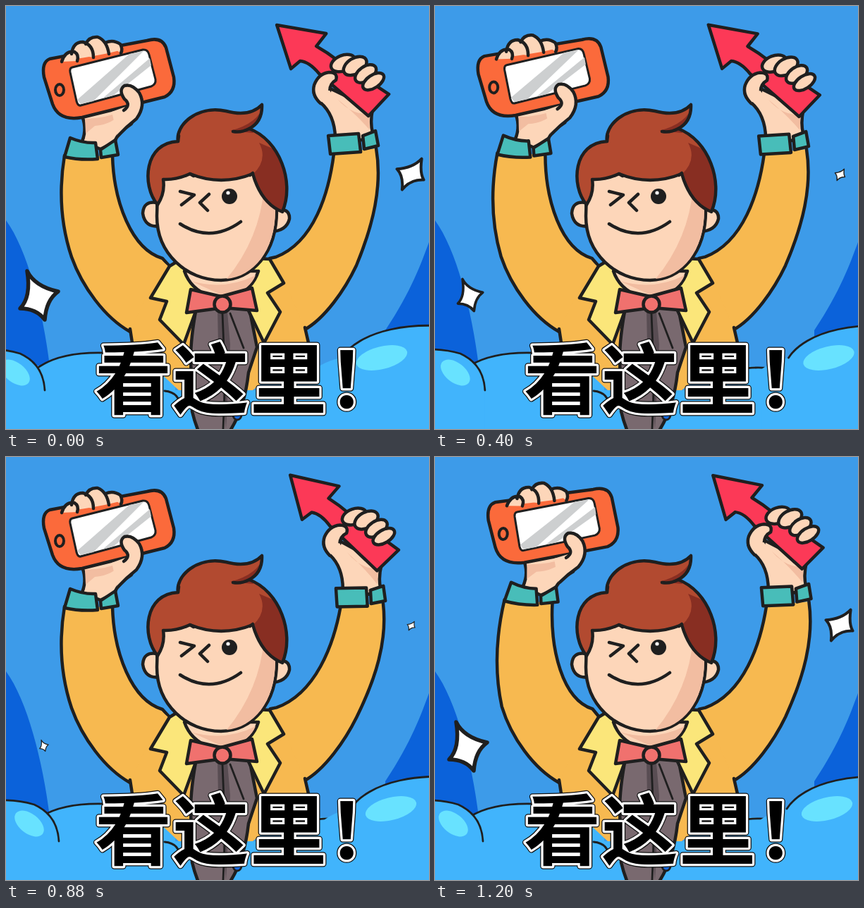
An HTML page for the animation above (1240 ms loop, 600 by 600 pixels).

```html
<!DOCTYPE html>
<html lang="zh-CN">
<head>
<meta charset="utf-8">
<style>
  html, body { margin: 0; width: 100%; height: 100%; overflow: hidden; background: #3d9be9; }
  svg { display: block; width: 100vw; height: 100vh; }
  .ink { stroke: #1f1f1f; stroke-width: 4.5; stroke-linecap: round; stroke-linejoin: round; }
  .thin { stroke-width: 2.8; }
  .star { stroke-width: 5.5; fill: #fff; }
  .line { fill: none; }
  .cloud { fill: #41b4fc; }
  .shine { fill: #68e2ff; }
  .skin { fill: #fdd6b9; }
  .shade { fill: #f2bda1; }
  .coat { fill: #f7b950; }
  .lapel { fill: #fbe67a; }
  .teal { fill: #48bdb9; }
  .bow { fill: #f0716e; }
  text { font: 700 109px "Noto Sans CJK SC", "Noto Sans CJK", sans-serif; letter-spacing: 1px; stroke-linejoin: round; }
</style>
</head>
<body>
<svg viewBox="0 0 600 600">
  <defs>
    <path id="hair" d="M215,282 C192,254 196,194 244,192 C240,170 270,140 312,149 Q346,158 363,140 Q364,164 345,174 C388,190 410,250 392,292 Q362,280 350,238 Q305,256 261,238 Q242,247 223,246 Q226,265 215,282Z"/>
    <clipPath id="hairClip"><use href="#hair"/></clipPath>
  </defs>
  <rect width="600" height="600" fill="#3d9be9"/>
  <path fill="#0b62da" d="M0,304 C30,345 52,430 62,510 H0Z M600,335 C590,362 575,405 538,460 V475 H600Z"/>

  <g id="starL"><path class="ink star" d="M-17,-35 Q-6,-13 27,-6 Q10,6 8,34 Q-4,18 -27,18 Q-11,2 -17,-35Z"/></g>
  <g id="starR"><path class="ink star" d="M20,-32 Q16,-4 24,9 Q-2,8 -18,28 Q-15,2 -28,-12 Q3,-14 20,-32Z"/></g>

  <path class="cloud" d="M30,600 V530 C55,500 90,488 140,493 L190,490 H240 V600Z M230,545 H600 V600 H230Z M430,545 V510 Q470,510 505,522 V545Z"/>
  <path class="ink thin line" d="M40,517 Q72,490 140,492 M225,546 Q249,548 247,575 M440,514 Q475,510 505,521"/>
  <g id="cloudL">
    <path class="cloud" d="M-90,600 V500 Q-30,480 20,493 Q53,508 55,545 V600Z"/>
    <path class="ink thin line" d="M-90,500 Q-30,478 20,493 Q53,508 55,545"/>
    <ellipse class="shine" cx="13" cy="520" rx="24" ry="14" transform="rotate(38 13 520)"/>
  </g>
  <g id="cloudR">
    <path class="cloud" d="M700,600 V462 C600,440 525,463 502,499 Q480,503 464,515 V600Z"/>
    <path class="ink thin line" d="M700,462 C600,440 525,463 502,499"/>
    <ellipse class="shine" cx="559" cy="499" rx="37" ry="16" transform="rotate(-14 559 499)"/>
  </g>

  <path id="sleeveL" class="ink coat"/>
  <path id="sleeveR" class="ink coat"/>

  <g id="handL">
    <path class="ink skin" d="M106,152 Q116,172 108,192 L134,203 L154,193 Q158,180 178,167 L185,140Z"/>
    <path class="shade" d="M112,160 Q140,160 168,148 Q152,168 126,170 L113,181Z"/>
    <path class="ink" fill="#fb6a3b" d="M62,75 L200,49 Q221,43 227,59 L238,101 Q241,121 225,129 L108,158 Q75,164 66,139 L54,101 Q50,80 62,75Z"/>
    <path class="ink" fill="#fff" style="stroke-width:3" d="M94,87 L194,62 Q201,61 203,69 L212,104 Q213,111 206,114 L106,141 Q102,142 100,135 L91,94 Q90,88 94,87Z"/>
    <path fill="#cdcfd0" d="M101,133 L175,68 L195,64 L124,135 L106,139Z M137,131 L204,74 L206,84 L152,127Z"/>
    <ellipse class="ink line" cx="76" cy="119" rx="6" ry="8" style="stroke-width:4"/>
    <path class="skin" d="M84,78 L101,65 L126,50 L150,53 L161,63 L145,67 L124,71 L100,75Z"/>
    <path class="ink skin" d="M79,79 Q84,63 97,65 Q104,69 101,78 M93,68 Q95,51 109,51 Q124,55 124,73 M113,54 Q118,43 130,44 Q143,49 146,68 M141,52 Q152,47 162,54 Q166,61 163,67"/>
    <path class="skin" d="M150,150 L172,142 L185,120 L193,140 L182,162 L158,184Z"/>
    <path class="ink skin" d="M167,148 Q178,140 168,132 Q159,119 168,113 Q179,110 189,123 Q199,141 185,160 Q171,171 160,183"/>
    <path class="ink teal" d="M91,187 Q110,195 127,194 L130,217 Q105,219 83,214Z M134,204 L155,190 L159,211 L135,215Z"/>
  </g>

  <g id="handR">
    <path class="ink skin" d="M441,108 Q430,124 446,137 Q466,154 467,187 L504,190 L520,180 Q516,165 520,146Z"/>
    <path class="shade" d="M470,132 Q490,155 516,153 L515,175 Q496,153 470,132Z"/>
    <path class="ink" fill="#fc3957" d="M384,27 L454,39 L440,57 Q456,66 470,77 L543,125 L514,156 L444,96 Q430,79 417,78 L404,89Z"/>
    <path class="ink skin" d="M459,121 Q459,110 468,105 Q471,94 458,94 Q443,96 437,112 Q433,126 446,138"/>
    <path class="skin" d="M440,118 L459,120 L472,140 L462,150Z"/>
    <g class="ink skin">
      <ellipse cx="478" cy="81" rx="18" ry="11" transform="rotate(-22 478 81)"/>
      <ellipse cx="495" cy="85" rx="18" ry="11" transform="rotate(-32 495 85)"/>
      <ellipse cx="510" cy="96" rx="17" ry="10" transform="rotate(-36 510 96)"/>
      <ellipse cx="521" cy="107" rx="17" ry="9" transform="rotate(-34 521 107)"/>
    </g>
    <path class="ink teal" d="M457,184 L500,181 L503,207 L460,210Z M506,184 L524,177 L528,198 L508,203Z"/>
  </g>

  <path class="coat" d="M176,460 L222,362 L300,430 L383,360 L424,458 L428,482 L350,545 H245 L182,486Z"/>
  <path class="ink line" d="M176,458 L180,484 M424,456 L430,482"/>
  <path class="ink" fill="#79696f" d="M270,428 Q262,470 262,500 L264,575 Q268,592 275,608 H314 Q338,575 344,520 L356,484 L345,428Z"/>
  <path fill="#594d53" d="M300,430 L314,434 L318,480 L312,600 L301,480Z"/>
  <path class="ink line thin" d="M307,436 L309,485 M318,436 L337,485 M310,550 L308,600"/>
  <ellipse class="ink thin" cx="328" cy="580" rx="6" ry="7" fill="#1767d9"/>
  <path class="ink lapel" d="M232,369 L205,414 L228,419 L218,445 L252,480 L268,436 L285,405 L250,358Z M374,359 L394,393 L371,407 L389,434 L366,478 L344,432 L328,405 L355,358Z"/>
  <path class="ink skin" d="M253,376 Q262,402 290,412 H322 Q350,402 358,376Z"/>
  <path class="shade" d="M262,390 Q310,404 354,382 Q346,402 320,410 H306Z"/>
  <path class="ink bow" d="M262,402 L305,412 L349,400 L356,432 L308,428 L256,435Z"/>
  <circle class="ink bow" cx="307" cy="423" r="11.5"/>

  <path class="ink skin" d="M214,279 Q195,276 194,294 Q197,315 218,312Z M382,289 Q403,286 402,302 Q398,319 376,320Z"/>
  <path class="ink skin" d="M216,236 L214,298 C214,351 256,389 305,389 C350,388 384,350 384,290 L370,225Z"/>
  <path class="shade" d="M366,258 Q360,330 313,387 C350,384 382,348 382,290Z"/>
  <use href="#hair" fill="#b24a30"/>
  <path clip-path="url(#hairClip)" fill="#882e22" d="M350,239 Q372,218 359,194 L385,205 L410,250 L395,300 L350,280Z M366,138 Q360,166 318,177 L350,180 L370,165Z"/>
  <use href="#hair" class="ink line"/>
  <path class="ink line" d="M244,192 L245,184 M261,238 L266,241 M350,237 L346,240 M345,174 Q334,180 322,178"/>
  <path class="ink line" d="M247,263 L267,268 L249,282 M288,267 L275,279 L286,290 M247,309 Q290,337 333,306"/>
  <circle cx="317" cy="270" r="11" fill="#1f1f1f"/>
  <circle cx="315" cy="265" r="2.6" fill="#fff"/>

  <g>
    <text x="126" y="570" stroke="#111" stroke-width="9">看这里！</text>
    <text x="126" y="570" stroke="#fff" stroke-width="6.5">看这里！</text>
    <text x="126" y="570">看这里！</text>
  </g>
</svg>
<script>
const LOOP = 1240, STEP = 40;
const $ = id => document.getElementById(id);
const put = (id, value) => $(id).setAttribute('transform', value);

// Smooth curve through [time, value] points.
function track(pts) {
  const slope = i => {
    const a = pts[Math.max(i - 1, 0)], b = pts[Math.min(i + 1, pts.length - 1)];
    return (b[1] - a[1]) / (b[0] - a[0]);
  };
  return t => {
    let i = 0;
    while (i < pts.length - 2 && t > pts[i + 1][0]) i++;
    const [t0, a] = pts[i], [t1, b] = pts[i + 1];
    const h = t1 - t0, u = Math.min((t - t0) / h, 1), v = 1 - u;
    return a * v * v * (1 + 2 * u) + b * u * u * (3 - 2 * u)
      + h * u * v * (slope(i) * v - slope(i + 1) * u);
  };
}

const phone = track([[0, 0], [110, -14], [280, 28], [420, 4], [555, -14], [720, 23],
  [760, 27], [880, 0], [980, -13], [1000, -12], [1160, 25], [1200, 22]]);
const driftL = track([[0, 0], [280, 23], [560, 3], [720, 15], [880, 20], [1000, 12], [1200, 13]]);
const driftR = track([[0, -26], [280, 0], [560, -8], [720, -21], [880, -13], [1000, -1], [1200, -3]]);
const sizeL = track([[0, 1], [280, .66], [560, .66], [720, .38], [880, .23], [1000, .65], [1200, 1]]);
const sizeR = track([[0, .73], [280, .39], [560, .27], [720, 1], [880, .21], [1000, .26], [1200, .73]]);

// Turn a sleeve about its pivot, fading to still at the shoulder.
function bend(d, [px, py], deg, still, full) {
  return d.replace(/(\d+),(\d+)/g, (_, x, y) => {
    const u = Math.max(0, Math.min(1, (still - y) / (still - full)));
    const r = deg * u * u * (3 - 2 * u) * Math.PI / 180, c = Math.cos(r), s = Math.sin(r);
    const dx = x - px, dy = y - py;
    return (px + dx * c - dy * s).toFixed(2) + ',' + (py + dx * s + dy * c).toFixed(2);
  });
}

const pivotL = [269, 494], pivotR = [417, 398];
const armL = 'M83,212 C75,260 77,308 93,356 C108,398 140,442 176,462 L262,440 L231,368 L222,358 C178,345 153,278 151,213';
const armR = 'M525,202 C534,255 521,310 497,368 C481,402 452,444 422,460 L350,440 L374,358 L383,356 C437,335 458,265 465,209';

function draw(t) {
  const left = phone(t) * .142;
  const right = -1 + 4.09 * Math.cos((t - 82) / 391 * 2 * Math.PI);
  put('handL', `rotate(${left} ${pivotL})`);
  put('handR', `rotate(${right} ${pivotR})`);
  $('sleeveL').setAttribute('d', bend(armL, pivotL, left, 410, 235));
  $('sleeveR').setAttribute('d', bend(armR, pivotR, right, 420, 260));
  put('cloudL', `translate(${driftL(t)})`);
  put('cloudR', `translate(${driftR(t)})`);
  const l = sizeL(t), r = sizeR(t);
  put('starL', `translate(${56 - 9 * l} ${409 + 2 * l}) scale(${l})`);
  put('starR', `translate(575 240) scale(${r})`);
}

function tick() {
  draw(Math.floor(performance.now() % LOOP / STEP) * STEP);
  requestAnimationFrame(tick);
}
tick();
</script>
</body>
</html>
```
